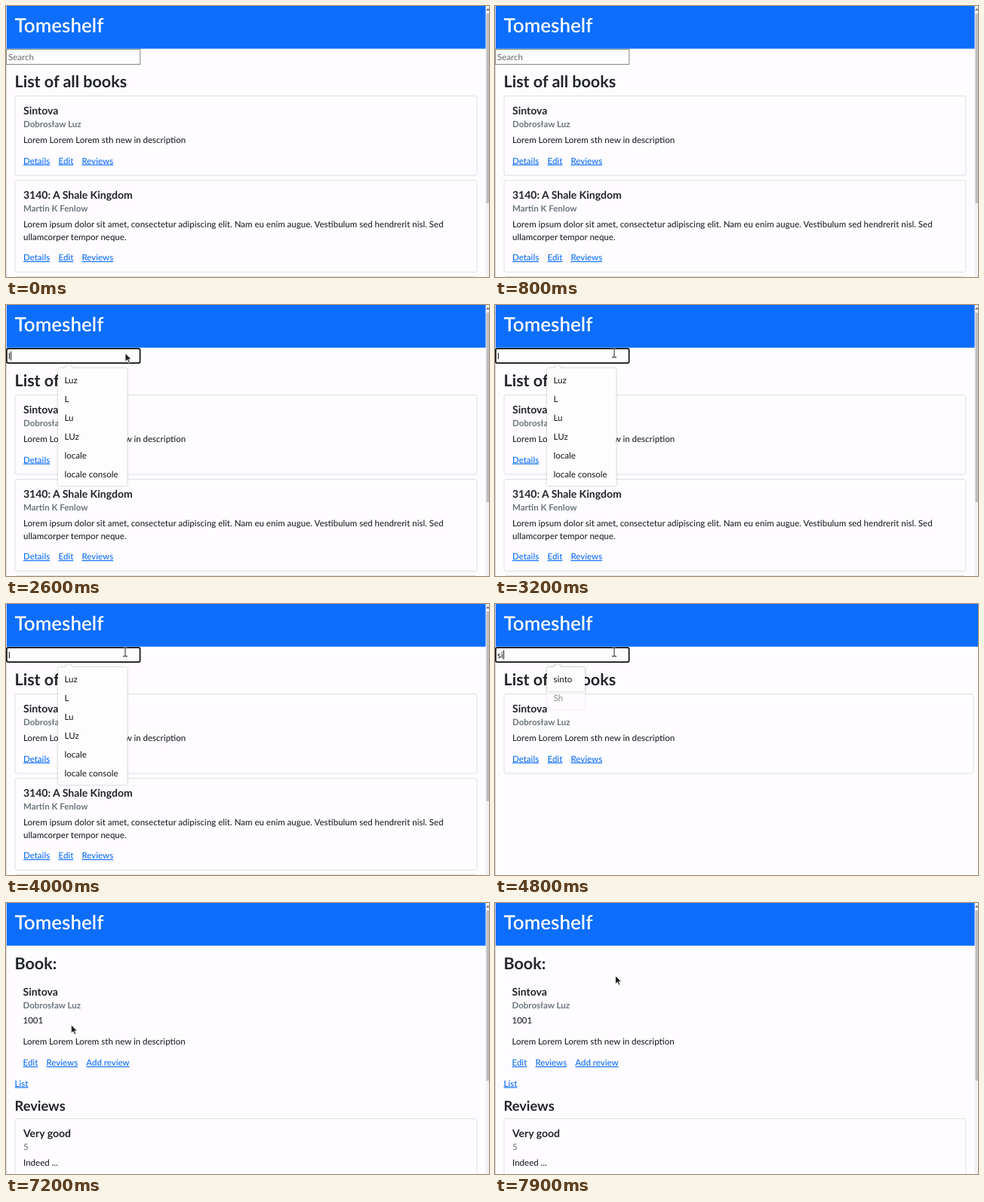
Recreate the animation shown at these times as an HTML page. Size 640 by 360 pixels, loop 8000 ms.

```html
<!DOCTYPE html>
<html lang="en">
<head>
<meta charset="utf-8">
<title>Book list search</title>
<style>
html, body { margin: 0; width: 100%; height: 100%; overflow: hidden; background: #fefcfe; }
svg { display: block; width: 100vw; height: 100vh; }
text { font-family: Lato, "Open Sans", sans-serif; font-size: 11.5px; font-weight: 500; fill: #212529; white-space: pre; text-rendering: geometricPrecision; }
.brand { font-size: 26px; font-weight: 600; fill: #fff; }
.h2 { font-size: 21.5px; font-weight: 700; }
.h3 { font-size: 18.3px; font-weight: 700; }
.h5 { font-size: 14px; font-weight: 700; }
.sub { font-weight: 700; fill: #6c757d; }
.grey { fill: #6c757d; }
.hint { fill: #757575; }
.link { fill: #0d6efd; text-decoration: underline; }
.card { fill: none; stroke: #dfdfe1; }
.menu { fill: #fefdfe; filter: drop-shadow(0 .5px 1.5px rgba(0,0,0,.27)); }
</style>
</head>
<body>
<svg id="stage" viewBox="0 0 640 360"></svg>
<script>
const LOOP = 8000;
const BOOK = { title: 'Sintova', author: 'Dobrosław Luz', text: 'Lorem Lorem Lorem sth new in description' };

const stage = document.getElementById('stage');
const text = (x, y, s, cls = '') => `<text x="${x}" y="${y}" class="${cls}">${s}</text>`;
const rect = (x, y, w, h, attrs) => `<rect x="${x}" y="${y}" width="${w}" height="${h}" ${attrs}/>`;
const group = (id, body) => `<g id="${id}">${body}</g>`;
const card = (y, h, cls = '') => rect(12, y, 612, h, `rx="3" class="card ${cls}"`);
const links = (y, items) => items.map(([x, s]) => text(x, y, s, 'link')).join('');
const cardLinks = y => links(y, [[23, 'Details'], [69.5, 'Edit'], [100.5, 'Reviews']]);
const rows = list => list.map((s, i) => text(77.5, 104 + 25 * i, s)).join('');
const menu = (w, h) =>
  `<path class="menu" d="M71 84H78L83 79L88 84H${67 + w}q2 0 2 2v${h - 4}q0 2 -2 2H71q-2 0 -2 -2v-${h - 4}q0 -2 2 -2z"/>`;

const firstBook = card(119.5, 105.5, 'wide') +
  text(23, 144, BOOK.title, 'h5') + text(23, 160.7, BOOK.author, 'sub') +
  text(23, 181.7, BOOK.text) + cardLinks(209.5);

const otherBooks = card(231.5, 122) + card(359.5, 100) +
  text(23, 256, '3140: A Shale Kingdom', 'h5') + text(23, 272.7, 'Martin K Fenlow', 'sub') +
  text(23, 293.7, 'Lorem ipsum dolor sit amet, consectetur adipiscing elit. Nam eu enim augue. Vestibulum sed hendrerit nisl. Sed') +
  text(23, 310.7, 'ullamcorper tempor neque.') + cardLinks(338);

const details = text(11.5, 87.5, 'Book:', 'h2') +
  text(22.5, 122.5, BOOK.title, 'h5') + text(22.5, 139.5, BOOK.author, 'sub') +
  text(22.5, 160.3, '1001') + text(22.5, 188, BOOK.text) +
  links(216, [[22.5, 'Edit'], [53.5, 'Reviews'], [106.3, 'Add review']]) +
  links(243.5, [[11.5, 'List']]) + text(11.5, 276, 'Reviews', 'h3') +
  card(286.5, 100) + text(23, 310.7, 'Very good', 'h5') +
  text(23, 327.5, '5', 'grey') + text(23, 349, 'Indeed ...');

stage.innerHTML =
  rect(0, 0, 640, 360, 'fill="#fefcfe"') +
  rect(0, 0, 640, 56.7, 'fill="#0d6efd"') +
  rect(0, 0, 1, 360, 'fill="#d4d3d5"') +
  text(11.5, 34.7, 'Tomeshelf', 'brand') +
  group('list',
    text(11.5, 108, 'List of all books', 'h2') + firstBook + group('others', otherBooks) +
    rect(.5, 57.5, 177.3, 20, 'id="field" fill="#fefdfe" stroke="#858585"') +
    rect(.9, 57.9, 176.7, 19.2, 'id="ring" rx="2" fill="#fefdfe" stroke="#101010" stroke-width="1.7"') +
    text(3, 71.7, 'Search', 'hint').replace('<text', '<text id="hint"') +
    '<text id="typed" x="3" y="71.7"></text>' +
    '<path id="spell" fill="none" stroke="#e33" stroke-width=".8"/>' +
    rect(0, 61.5, 1, 12, 'id="caret" fill="#111"')) +
  group('details', details) +
  group('menuAll', menu(91.5, 156) + '<g id="options"></g>') +
  group('menuFade', menu(50, 56) + text(77.5, 129, 'Sh')) +
  group('menuOne', menu(50, 32) + rows(['sinto'])) +
  group('bar', rect(635.5, 0, 4.5, 360, 'fill="#f1f0f2"') + rect(636.5, 10, 3.5, 252, 'id="thumb" fill="#bebdbf"') +
    '<path d="M636 6L638.5 3L641 6z" fill="#777"/>') +
  group('arrow', '<path d="M0 0V11.2L2.7 8.8L4.5 12.8L6.4 12L4.6 8.1H8.2z" fill="#222" stroke="#fff" stroke-width=".8"/>') +
  group('beam', '<path d="M-3 -6.5H-1L0 -5.5L1 -6.5H3M0 -5.5V4.5M-3 5.5H-1L0 4.5L1 5.5H3" fill="none" stroke="#555" stroke-width="1.3"/>') +
  group('hand', '<path d="M-1 0q1 -1 2 0v5l5 1q1 0 1 2l-1 5h-6l-4 -5q0 -2 3 0z" fill="#fff" stroke="#222" stroke-width=".9"/>');

const el = {};
stage.querySelectorAll('[id]').forEach(n => { el[n.id] = n; });
const firstCard = stage.querySelector('.wide');
const show = (id, on) => el[id].setAttribute('display', on ? 'inline' : 'none');
const set = (id, attrs) => { for (const k in attrs) el[id].setAttribute(k, attrs[k]); };

// [time, field text]; focus comes with the first entry
const KEYS = [[1250, ''], [2300, 'l'], [4250, ''], [4500, 's'], [4700, 'si'], [5000, 'sin'], [5200, 'sint']];
// [time, x, y] of the pointer
const PATH = [[1000, 300, 190], [1250, 158, 64], [5500, 158, 64], [6300, 30, 213.5],
  [6550, 30, 213.5], [6750, 38, 205], [7050, 38, 205], [7400, 159.5, 96.5]];
const ALL = ['Luz', 'L', 'Lu', 'console', 'locale console', 'locale'];
const WITH_L = ['Luz', 'L', 'Lu', 'LUz', 'locale', 'locale console'];
const OPEN = 7000;

const ease = p => p * p * (3 - 2 * p);
function pointer(t) {
  const i = PATH.findIndex(p => p[0] > t);
  if (i < 0) return PATH[PATH.length - 1].slice(1);
  const [a, b] = [PATH[Math.max(0, i - 1)], PATH[i]];
  const p = i ? ease((t - a[0]) / (b[0] - a[0])) : 0;
  return [a[1] + (b[1] - a[1]) * p, a[2] + (b[2] - a[2]) * p];
}

let shownOptions;
function setOptions(list) {
  if (list === shownOptions) return;
  shownOptions = list;
  el.options.innerHTML = rows(list);
}

function draw(t) {
  const key = KEYS.filter(k => k[0] <= t).pop();
  const focus = !!key, value = key ? key[1] : '';
  const onList = t < OPEN, single = value.length > 1;

  show('list', onList);
  show('details', !onList);
  show('others', !single);
  show('bar', !onList || !single);
  set('thumb', { height: onList ? 252 : 226 });
  firstCard.setAttribute('width', single ? 622 : 612);

  show('field', !focus);
  show('ring', focus);
  show('hint', !value);
  el.typed.textContent = value;
  const end = 3 + (value ? el.typed.getComputedTextLength() : 0);
  set('caret', { x: end + .3 });
  show('caret', focus && Math.floor((t - key[0]) / 500) % 2 === 0);
  show('spell', value.length > 3);
  let wave = 'M3 74';
  for (let x = 4.5, up = 1; x < end; x += 1.5, up = 1 - up) wave += `L${x} ${74 - up}`;
  set('spell', { d: wave });

  const menuOn = onList && t >= 1300, sMenu = value[0] === 's';
  setOptions(value === 'l' ? WITH_L : ALL);
  show('menuAll', menuOn && !sMenu);
  show('menuOne', menuOn && sMenu);
  show('menuFade', menuOn && sMenu && t < 4900);
  set('menuFade', { opacity: t < 4700 ? 1 : Math.max(0, 1 - (t - 4700) / 200) });

  const [x, y] = pointer(t);
  const seen = t >= 1000;
  const hand = onList && x > 22 && x < 59 && y > 198 && y < 212;
  const beam = onList && x < 178 && y > 57 && y < 78 && !(t >= 2300 && t < 2900);
  for (const [id, on] of [['arrow', !hand && !beam], ['beam', beam], ['hand', hand]]) {
    show(id, seen && on);
    set(id, { transform: `translate(${x} ${y})` });
  }
}

const start = performance.now();
function tick() {
  draw((performance.now() - start) % LOOP);
  requestAnimationFrame(tick);
}
tick();
</script>
</body>
</html>
```
